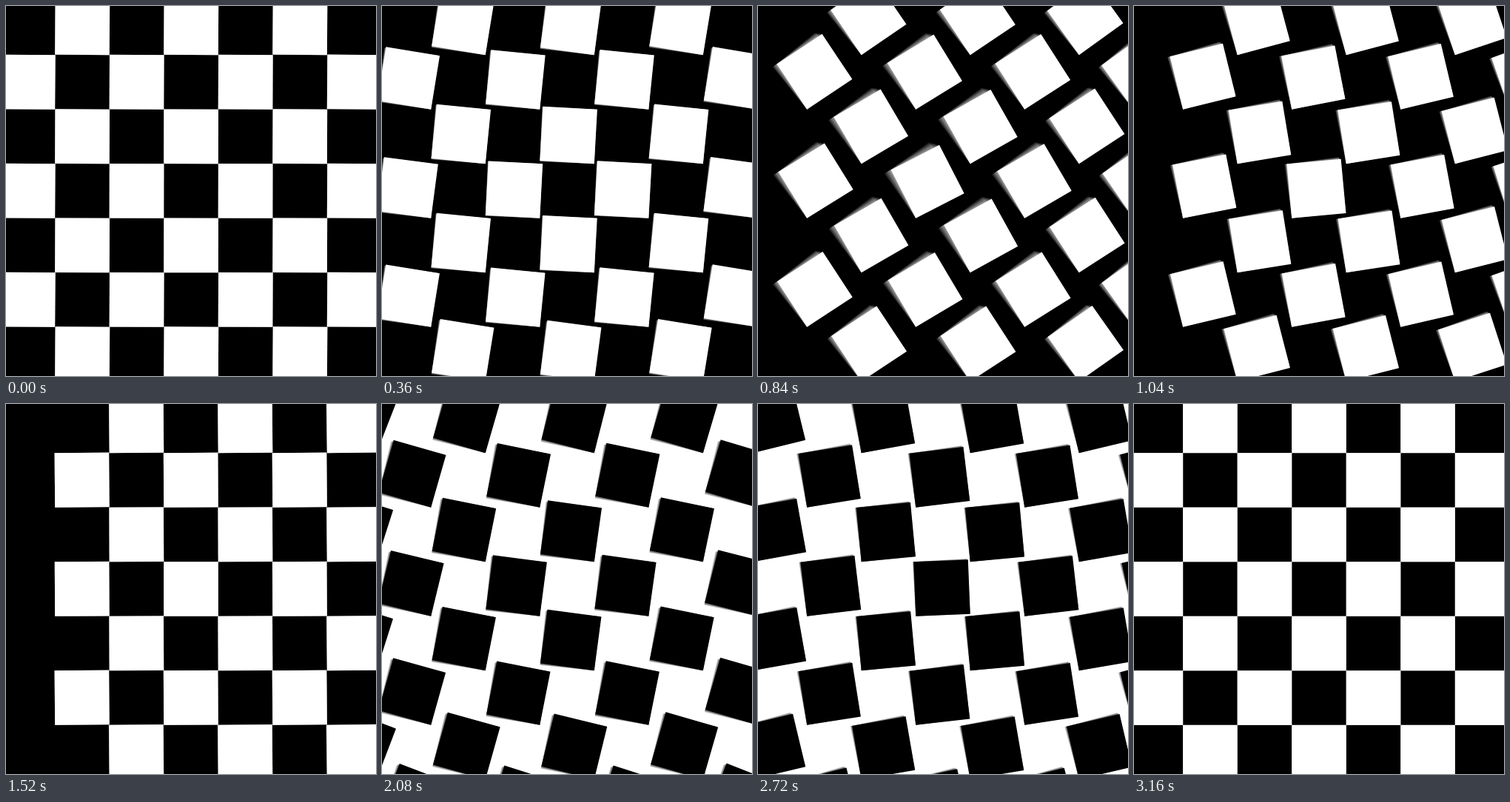
An HTML page without scripts that plays this animation: 500x500 px, repeating every 3200 ms.

```html
<!DOCTYPE html>
<html lang="en">
<head>
<meta charset="utf-8">
<title>Turning checkerboard</title>
<style>
  @property --s { syntax: "<number>"; inherits: true; initial-value: 0; }
  @property --v { syntax: "<number>"; inherits: true; initial-value: -1; }
  @property --q { syntax: "<number>"; inherits: true; initial-value: -1; }
  @property --u { syntax: "<number>"; inherits: true; initial-value: 0; }
  @property --cx { syntax: "<number>"; inherits: true; initial-value: 0; }
  @property --cy { syntax: "<number>"; inherits: true; initial-value: 0; }
  @property --d { syntax: "<number>"; inherits: true; initial-value: 0; }

  html, body { margin: 0; width: 100%; height: 100%; overflow: hidden; background: #000; }

  svg {
    display: block;
    width: 500px;
    height: 500px;
    animation: turn 1.6s steps(40) -44ms infinite, swap 3.2s step-end -44ms infinite;
  }
  @keyframes turn { from { --s: 0; } to { --s: 1; } }
  @keyframes swap {
    0% { color: #fff; background: #000; }
    50% { color: #000; background: #fff; }
  }

  /* v: signed progress, q: its sign, u: closeness to mid-turn,
     cx, cy: typical offset of a square's centre from its pivot */
  .layer {
    --v: calc(2 * max(0, var(--s) - var(--i) * .0035) - 1);
    --q: clamp(-1, var(--v) * 1000000, 1);
    --u: max(0, 1 - max(var(--v), -1 * var(--v)));
    --m: calc(45deg * var(--q) * (1 - pow(var(--u), 3.6)));
    --cx: calc(52 * sin(var(--m)));
    --cy: calc(-52 * cos(var(--m)));
  }
  .ghost { opacity: .12; }

  /* the easing softens with distance d from the middle */
  .sq {
    --d: hypot(var(--x) * 73.53 + var(--cx), var(--y) * 73.53 + var(--cy));
    --k: calc(var(--d) / 1300);
    --g: max(1, 5.1 - var(--d) * .0082);
    --h: calc((1 - var(--k)) * pow(var(--u), var(--g)) + var(--k) * var(--u));
    fill: currentColor;
    transform-origin: 0 0;
    transform:
      translate(calc(250px + var(--x) * 73.53px), calc(250px + var(--y) * 73.53px))
      rotate(calc(45deg * (1 + var(--q) * (1 - var(--h)))));
  }
</style>
</head>
<body>
<svg viewBox="0 0 500 500">
  <defs>
    <rect id="sq" class="sq" x="-73.53" y="-73.53" width="73.53" height="73.53"/>
    <g id="odd">
      <use href="#sq" style="--x:-3.5"/>
      <use href="#sq" style="--x:-1.5"/>
      <use href="#sq" style="--x:.5"/>
      <use href="#sq" style="--x:2.5"/>
    </g>
    <g id="even">
      <use href="#sq" style="--x:-4.5"/>
      <use href="#sq" style="--x:-2.5"/>
      <use href="#sq" style="--x:-.5"/>
      <use href="#sq" style="--x:1.5"/>
      <use href="#sq" style="--x:3.5"/>
    </g>
    <g id="board">
      <use href="#odd" style="--y:-2.5"/>
      <use href="#even" style="--y:-1.5"/>
      <use href="#odd" style="--y:-.5"/>
      <use href="#even" style="--y:.5"/>
      <use href="#odd" style="--y:1.5"/>
      <use href="#even" style="--y:2.5"/>
      <use href="#odd" style="--y:3.5"/>
      <use href="#even" style="--y:4.5"/>
    </g>
  </defs>
  <use class="layer ghost" href="#board" style="--i:7"/>
  <use class="layer ghost" href="#board" style="--i:6"/>
  <use class="layer ghost" href="#board" style="--i:5"/>
  <use class="layer ghost" href="#board" style="--i:4"/>
  <use class="layer ghost" href="#board" style="--i:3"/>
  <use class="layer ghost" href="#board" style="--i:2"/>
  <use class="layer ghost" href="#board" style="--i:1"/>
  <use class="layer" href="#board" style="--i:0"/>
</svg>
</body>
</html>
```
